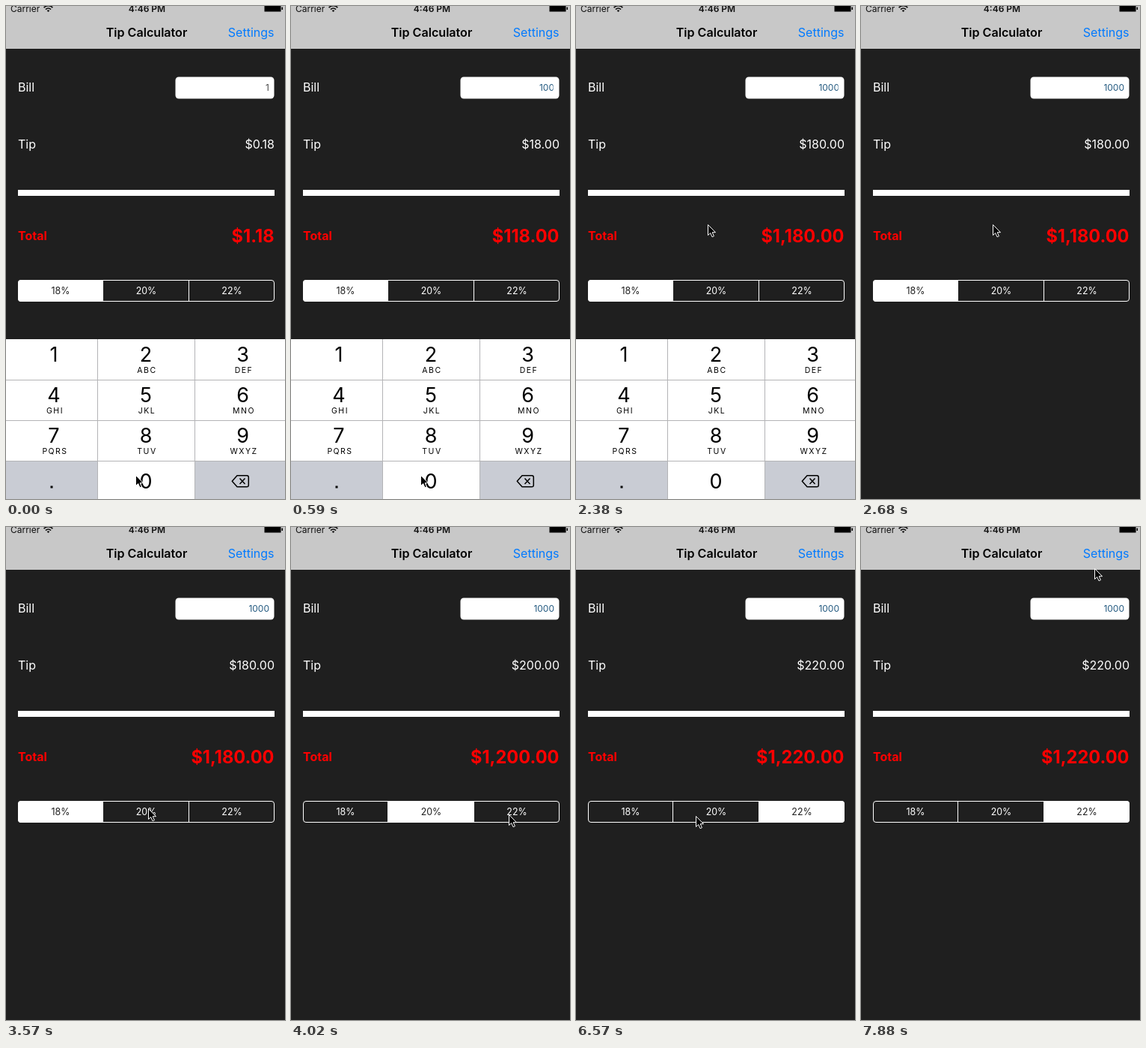
These frames come from a looping animation (373 by 657 pixels, 8 s). An HTML page:

```html
<!DOCTYPE html>
<html lang="en">
<head>
<meta charset="utf-8">
<title>Tip Calculator</title>
<style>
  html, body { margin: 0; width: 100%; height: 100%; overflow: hidden; background: #1f1f1f; }
  svg { display: block; width: 373px; height: 657px; }
  text { font-family: Inter, Roboto, sans-serif; font-size: 16px; fill: #fff; }
  .end { text-anchor: end; }
  .mid { text-anchor: middle; }
  .status { font-size: 12px; fill: #111; }
  .title { font-size: 16.1px; font-weight: 600; fill: #000; }
  .link { fill: #007aff; }
  .red { fill: #f00; font-weight: 700; }
  .total { font-size: 23.6px; }
  .bill { font-size: 12px; }
  .seg { font-size: 12.4px; }
  .digit { font-size: 27px; fill: #000; }
  .letters { font-size: 10.5px; letter-spacing: 1.5px; fill: #000; }
</style>
</head>
<body>
<svg viewBox="0 0 373 657">
  <defs>
    <clipPath id="field"><rect x="227" y="94" width="123.6" height="30"/></clipPath>
    <clipPath id="pill"><rect x="16" y="365" width="343" height="29" rx="4"/></clipPath>
  </defs>
  <rect width="373" height="657" fill="#1f1f1f"/>

  <rect width="373" height="57" fill="#c8c8c8"/>
  <text class="status" x="6" y="8">Carrier</text>
  <g fill="none" stroke="#111" stroke-width="1.7">
    <path d="M50.6 2.2a8.3 8.3 0 0 1 11.8 0M53 4.6a5 5 0 0 1 7 0"/>
    <path d="M54.7 6.2a2.6 2.6 0 0 1 3.6 0L56.5 8z" fill="#111" stroke="none"/>
  </g>
  <text class="status mid" x="188.5" y="8" font-weight="600">4:46 PM</text>
  <path d="M345.5 0h22v7.5h-22zM368.5 1.5h1.5v3.5h-1.5z"/>
  <text class="title mid" x="188" y="41">Tip Calculator</text>
  <text class="link end" x="358.5" y="41">Settings</text>

  <text x="16" y="114">Bill</text>
  <rect x="226.500" y="94.500" width="132" height="29" rx="4.500" fill="#fff"/>
  <g id="billBox"><text id="bill" class="bill end" x="352" y="113"></text></g>
  <text x="16" y="190">Tip</text>
  <text id="tip" class="end" x="359" y="190"></text>
  <rect x="16" y="245" width="343" height="8" fill="#fff"/>
  <text class="red" x="16" y="311.500">Total</text>
  <text id="total" class="red total end" x="358.500" y="314.500"></text>

  <g clip-path="url(#pill)"><rect id="chosen" y="365" width="115" height="29" fill="#fff"/></g>
  <path d="M129.500 365v29M244.500 365v29" stroke="#fff"/>
  <rect x="16.500" y="365.500" width="342" height="28" rx="3.500" fill="none" stroke="#fff"/>
  <g id="rates"></g>

  <g id="pad">
    <rect y="444" width="373" height="213" fill="#fff"/>
    <path d="M0 606h122.500v51H0zM252.500 606H373v51H252.500z" fill="#c9ccd4"/>
    <rect id="zero" x="123" y="607" width="129" height="50" fill="#c9ccd4"/>
    <path d="M0 498.500h373M0 552.500h373M0 606.500h373M122.500 444v213M252.500 444v213" stroke="#b4b4b6"/>
    <g id="keys"></g>
    <rect x="59.500" y="639.500" width="3" height="3"/>
    <g fill="none" stroke="#000" stroke-width="1.500">
      <path d="M309 625.700h13a2.300 2.300 0 0 1 2.300 2.300v10.500a2.300 2.300 0 0 1-2.300 2.300h-13l-6.700-7.500z" stroke-linejoin="round"/>
      <path d="M312.500 629.500l7 7.500M319.500 629.500l-7 7.500"/>
    </g>
  </g>

  <path id="cursor" d="M.5.5V14.500L3.700 11.500 6 16.700 8.400 15.700 6.200 10.700H10.500z" stroke="#fff"/>
</svg>
<script>
const LOOP = 8000;
const RATES = [18, 20, 22];
const $ = id => document.getElementById(id);

// time, bill, zero key held, chosen rate, keypad shown
const STATES = [
  [0, 1, 0, 0, 1],
  [150, 1, 1, 0, 1],
  [300, 10, 0, 0, 1],
  [440, 10, 1, 0, 1],
  [590, 100, 0, 0, 1],
  [1040, 100, 1, 0, 1],
  [1190, 1000, 0, 0, 1],
  [2680, 1000, 0, 0, 0],
  [3580, 1000, 0, 1, 0],
  [4320, 1000, 0, 2, 0]
];

// pointer moves: start time, then one position per step
const MOVES = [
  [0, [173, 625]],
  [1340, [174, 612], [176, 560], [182, 480], [184, 400], [181, 335], [178, 298], [177, 293], [176, 291]],
  [3130, [178, 300], [184, 332], [188, 368], [190, 375], [215, 378], [262, 381], [291, 383]],
  [4470, [284, 386], [255, 389], [215, 390], [175, 390], [155, 390]],
  [5820, [135, 391], [85, 395], [45, 398], [58, 396], [105, 392], [160, 385], [200, 381], [211, 388]],
  [7010, [195, 445], [181, 482], [203, 420], [245, 290], [288, 150], [312, 55], [318, 22]]
];
const STEP = 148;
const PATH = MOVES.flatMap(([start, ...spots]) =>
  spots.map((spot, i) => [start + Math.floor(i * STEP / 10) * 10, ...spot]));

function addText(parent, cls, x, y, str) {
  const el = document.createElementNS(parent.namespaceURI, "text");
  el.setAttribute("class", cls);
  el.setAttribute("x", x);
  el.setAttribute("y", y);
  el.textContent = str;
  parent.append(el);
  return el;
}

const labels = RATES.map((rate, i) =>
  addText($("rates"), "seg mid", 73 + i * 114.5, 384, rate + "%"));

const LETTERS = ["", "ABC", "DEF", "GHI", "JKL", "MNO", "PQRS", "TUV", "WXYZ"];
const COLS = [64, 187, 316.5];
LETTERS.forEach((str, i) => {
  const x = COLS[i % 3], y = 474 + Math.floor(i / 3) * 54;
  addText($("keys"), "digit mid", x, y, i + 1);
  addText($("keys"), "letters mid", x + 1.5, y + 15, str);
});
addText($("keys"), "digit mid", 187, 643, 0);

const money = n => "$" + n.toLocaleString("en-US", { minimumFractionDigits: 2, maximumFractionDigits: 2 });
const at = (table, t) => table.findLast(row => row[0] <= t);

function draw(t) {
  const [, bill, held, pick, pad] = at(STATES, t);
  const [, x, y] = at(PATH, t);
  const tip = bill * RATES[pick] / 100;
  $("bill").textContent = bill;
  $("bill").style.fill = bill > 1 ? "#245a80" : "#4a4a4a";
  $("billBox").setAttribute("clip-path", pad && bill > 1 ? "url(#field)" : "none");
  $("tip").textContent = money(tip);
  $("total").textContent = money(bill + tip);
  $("chosen").setAttribute("x", [15, 129.5, 244][pick]);
  labels.forEach((el, i) => el.style.fill = i === pick ? "#1f1f1f" : "#fff");
  $("pad").style.display = pad ? "" : "none";
  $("zero").style.display = held ? "" : "none";
  $("cursor").setAttribute("transform", `translate(${x} ${y})`);
}

const begin = performance.now();
function tick() {
  draw((performance.now() - begin) % LOOP);
  requestAnimationFrame(tick);
}
tick();
</script>
</body>
</html>
```
